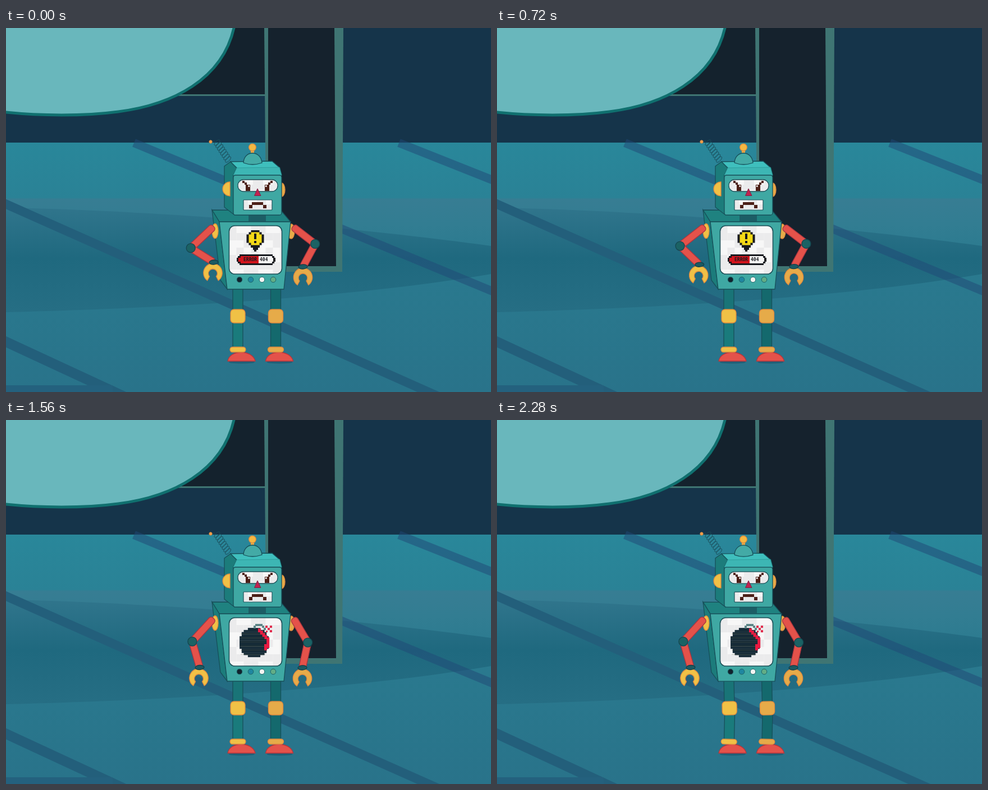
An HTML page with a canvas for the animation above (2.32 s loop, 864 by 648 pixels).

```html
<!DOCTYPE html>
<html lang="en">
<head>
<meta charset="utf-8">
<title>Robot</title>
<style>
html, body { margin: 0; width: 100%; height: 100%; overflow: hidden; background: #15344a; }
canvas { display: block; width: 100vw; height: 100vh; }
</style>
</head>
<body>
<canvas id="stage" width="864" height="648"></canvas>
<script>
const c = document.getElementById('stage').getContext('2d');
const LOOP = 2320, STEP = 40, SCREEN_SWAP = 1440;
const INK = '#17505a', FRONT = '#3fa8a3', SIDE = '#1c7c7b', RED = '#e4524a', BROWN = '#4d2018';
const YELLOW = '#f0c146', ORANGE = '#e6ab49', RIM = '#e08a3f';

function paint(fill, stroke, width = 1.3) {
  if (fill) { c.fillStyle = fill; c.fill(); }
  if (stroke) { c.strokeStyle = stroke; c.lineWidth = width; c.stroke(); }
}
function poly(points, fill, stroke, width) {
  c.beginPath();
  for (let i = 0; i < points.length; i += 2) c.lineTo(points[i], points[i + 1]);
  c.closePath();
  paint(fill, stroke, width);
}
function oval(x, y, rx, ry, fill, stroke, width) {
  c.beginPath();
  c.ellipse(x, y, rx, ry, 0, 0, 7);
  paint(fill, stroke, width);
}
function box(x, y, w, h, r, fill, stroke, width) {
  c.beginPath();
  c.roundRect(x, y, w, h, r);
  paint(fill, stroke, width);
}
function rect(fill, x, y, w, h) {
  c.fillStyle = fill;
  c.fillRect(x, y, w, h);
}
function line(x1, y1, x2, y2, width, color) {
  c.beginPath();
  c.moveTo(x1, y1);
  c.lineTo(x2, y2);
  paint(null, color, width);
}
function at(x, y, angle, draw) {
  c.save();
  c.translate(x, y);
  c.rotate(angle);
  draw();
  c.restore();
}
// Outlined bar from one point to another
function bar(x1, y1, x2, y2, w, r, fill, stroke) {
  at(x1, y1, Math.atan2(y2 - y1, x2 - x1), () =>
    box(0, -w / 2, Math.hypot(x2 - x1, y2 - y1), w, r, fill, stroke));
}
function ramp(y1, y2, stops) {
  const g = c.createLinearGradient(0, y1, 0, y2);
  for (const [p, color] of stops) g.addColorStop((p - y1) / (y2 - y1), color);
  return g;
}

function background() {
  rect('#15344a', 0, 0, 864, 204);
  rect('#14222d', 250, 0, 212, 119);
  rect('#3f7573', 290, 118, 172, 3);

  rect(ramp(204, 648, [[204, '#29879a'], [302, '#2a8296'], [305, '#377d93'],
    [350, '#327d92'], [410, '#2a7a8f'], [648, '#29738a']]), 0, 204, 864, 444);
  c.beginPath();
  c.moveTo(0, 320);
  c.bezierCurveTo(290, 325, 640, 357, 864, 388);
  c.lineTo(864, 438);
  c.bezierCurveTo(640, 476, 330, 498, 0, 506);
  paint(ramp(320, 506, [[320, '#30758c'], [410, '#1f697f'], [506, '#266e84']]));

  line(228, 204.5, 870, 470, 15, 'rgba(33,73,118,.5)');
  line(700, 204.5, 870, 272, 15, 'rgba(33,73,118,.5)');
  line(-10, 309, 775, 658, 16, '#235f7b');
  line(-10, 554, 210, 656, 18, '#235f7b');
  rect('#24617e', 0, 636, 190, 12);

  poly([460, 0, 601, 0, 599, 434, 464, 434], '#3f7573');
  poly([467, 0, 585, 0, 588, 424, 467, 424], '#15222d');

  c.beginPath();
  c.moveTo(-10, -10);
  c.lineTo(-10, 149);
  c.bezierCurveTo(60, 157, 140, 157, 200, 149);
  c.bezierCurveTo(292, 137, 390, 94, 408, -10);
  paint('#69b7bc', '#10706f', 5);
}

function leg(x, dip, bend, pad, thigh, shin) {
  const s = Math.sqrt(dip), kx = x + bend * s, ky = 513 + 0.7 * dip;
  oval(x + 7, 595, 23, 2.5, 'rgba(25,75,100,.5)');
  bar(x - 0.06 * dip, 460 + dip, kx, ky, 18, 0, thigh, INK);
  bar(kx + 2.1 * s, ky + 9, x + 2 * s, 573, 18, Math.min(4, s), shin, INK);
  at(kx, ky, -0.08 * s, () => box(-13, -12, 26, 24, 6, pad, RIM));
  c.beginPath();
  c.moveTo(x - 18, 593);
  c.bezierCurveTo(x - 15, 572, x + 26, 572, x + 31, 593);
  c.closePath();
  paint(RED, '#b8343c');
  at(x + 1.1 * s, 572.5 + 0.8 * s, 0.14 * s, () => box(-14, -4.5, 28, 9, 4.5, pad, RIM));
}

// Two-bone arm; side is -1 for left, 1 for right
function arm(sx, sy, wx, wy, upper, lower, side, color) {
  const dx = wx - sx, dy = wy - sy, d = Math.min(Math.hypot(dx, dy), upper + lower - 0.1);
  const bend = Math.acos((upper * upper + d * d - lower * lower) / (2 * upper * d));
  const a = Math.atan2(dy, dx) - side * bend;
  const ex = sx + upper * Math.cos(a), ey = sy + upper * Math.sin(a);
  bar(sx - 4 * Math.cos(a), sy - 4 * Math.sin(a), ex, ey, 12.5, 5, RED, '#a93440');
  bar(ex, ey, wx, wy, 12.5, 4, RED, '#a93440');
  oval(ex, ey, 8, 8, '#1b6264', '#154650');
  const hx = wx - (side < 0 ? 1.5 : 0), hy = wy + 19;
  c.beginPath();
  c.arc(hx, hy, 16.7, 2.2, 7.23);
  c.arc(hx, hy + 1, 8, 7.0, 2.42, true);
  c.closePath();
  paint(color, RIM);
  at(wx, wy, -0.05, () => oval(0, 0, 8, 4, '#1b5a62', '#143f49'));
}

// Rounded white panel with a faint checker and an outline
function panel(x, y, w, h, r, size, width) {
  box(x, y, w, h, r, '#f7f7f7');
  c.save();
  c.clip();
  for (let j = 0; j * size < h; j++)
    for (let i = 0; i * size < w; i++)
      if ((i * 3 + j * 5 + i * j) % 4 < 2) rect('#ebebec', x + i * size, y + j * size, size, size);
  c.restore();
  box(x, y, w, h, r, null, '#1f525a', width);
}

// Disc built of square cells
function disc(x, y, r, cell, color) {
  const n = Math.ceil(r / cell);
  for (let j = -n; j < n; j++) {
    const v = (j + 0.5) * cell;
    if (Math.abs(v) >= r) continue;
    const half = Math.round(Math.sqrt(r * r - v * v) / cell) * cell;
    rect(color, x - half, y + j * cell, half * 2, cell + 0.3);
  }
}

function warning() {
  const dark = '#17191f';
  rect(dark, 436, 386, 16, 5);
  rect(dark, 440, 390, 9, 5);
  rect(dark, 442, 394, 4, 4);
  for (const [w, h] of [[15, 30], [23, 23], [31, 15]]) rect(dark, 444 - w / 2, 375 - h / 2, w, h);
  for (const [w, h] of [[15, 23], [23, 15]]) rect('#f4d916', 444 - w / 2, 375 - h / 2, w, h);
  rect(dark, 442, 366, 4, 10);
  rect(dark, 442, 379, 4, 4);

  rect(dark, 416, 403, 59, 19);
  rect(dark, 413, 406, 65, 13);
  rect(dark, 411, 409, 69, 7);
  rect('#f5f5f5', 450, 406, 24, 13);
  rect('#f5f5f5', 473, 409, 3, 7);
  rect('#d3141c', 418, 406, 32, 13);
  rect('#d3141c', 414, 409, 5, 7);
  c.fillStyle = dark;
  c.font = 'bold 8px "DejaVu Sans Mono", monospace';
  c.textBaseline = 'middle';
  c.fillText('ERROR', 423, 413);
  c.fillText('404', 452, 413);
}

function bomb() {
  disc(442, 396, 27, 3.7, '#162b37');
  for (let i = 0; i < 5; i++) rect('#ea1a42', 449 + i * 3.8, 371 + i * 4, 5, i < 4 ? 7 : 19);
  rect('#ea1a42', 460, 399, 5, 11);
  for (let y = 380; y < 420; y += 7.4) rect('rgba(95,98,60,.4)', 418, y, 44, 0.7);
  rect('#5c8587', 441, 366, 4, 5);
  rect('#5c8587', 444, 363, 13, 4);
  rect('#5c8587', 456, 366, 4, 4);
  rect('#5c8587', 459, 370, 4, 4);
  rect('#e02c4d', 462, 366, 4, 4);
  rect('#e02c4d', 470, 366, 4, 4);
  rect('#e02c4d', 466, 370, 4, 4);
  rect('#e02c4d', 470, 374, 4, 4);
  rect('#e02c4d', 463, 375, 3, 3);
}

function torso(t) {
  poly([367, 324, 490, 325, 507, 345, 380, 345], '#1f8280', INK);
  rect('#1c5d65', 432, 331, 31, 13);
  poly([367, 324, 380, 345, 394, 465, 382, 449], SIDE, INK);
  poly([380, 345, 507, 345, 495, 465, 394, 465], FRONT, INK);
  panel(397.5, 352, 94, 86, 10, 13, 1.6);
  (t < SCREEN_SWAP ? warning : bomb)();
  ['#10222d', '#2087a0', '#f3f5f2', '#62ad86'].forEach((color, i) =>
    oval(416 + i * 20, 448, 4.8, 4.8, color, '#1d6468', 1));
}

function head() {
  // Spring
  for (let i = 0; i < 8; i++)
    at(376 + i * 2.8, 204 + i * 4.3, -0.8, () => oval(0, 0, 6.5, 2.9, null, '#1b4b57', 0.9));
  line(365, 203, 372, 201, 1, '#1b4b57');
  oval(364.5, 202.5, 2.7, 2.7, '#f0a04a', RIM, 0.8);

  oval(491, 288, 6, 12, ORANGE, RIM);
  poly([389, 246, 400, 238, 411, 249, 405, 262, 407, 333, 389, 319], SIDE, INK);
  poly([400, 238, 474, 237, 488, 249, 491, 262, 405, 262, 411, 249], '#3fbfbd', INK);
  poly([411, 249, 487, 248, 491, 262, 405, 262], '#3db6b4', '#2a9796', 0.8);
  box(405, 262, 86, 71, 4, FRONT, INK);
  c.beginPath();
  c.ellipse(399, 286.5, 13, 12.5, 0, Math.PI / 2, Math.PI * 1.5);
  c.closePath();
  paint(YELLOW, RIM);

  rect(ORANGE, 436, 216, 6, 9);
  oval(439, 212.5, 6.3, 6.3, '#f4b942', RIM);
  c.beginPath();
  c.moveTo(423, 240);
  c.bezierCurveTo(424, 217, 454, 217, 456, 240);
  c.quadraticCurveTo(439, 246, 423, 240);
  paint('#43aaa6', INK);

  panel(413, 270, 71, 21, 10, 9, 1.3);
  for (const s of [-1, 1]) {
    const px = (x, y, w, h, color = BROWN) =>
      rect(color, 448 + s * x - (s < 0 ? w : 0), y, w, h);
    px(23, 272, 4, 4);
    px(19, 275, 4, 4);
    px(13, 279, 8, 11);
    px(14, 280, 2.5, 3, '#f7f7f7');
  }
  poly([448, 286, 454, 298.5, 442.5, 298.5], '#c12450', '#7a2244', 1);

  panel(423, 306, 51, 18, 1, 8, 1.2);
  rect(BROWN, 438, 310, 20, 5);
  rect(BROWN, 433, 315, 6, 6);
  rect(BROWN, 458, 315, 6, 6);
}

// Wrist poses: time, left x, y, right x, y
const wrists = [
  [0, 370, 417, 529, 425],
  [440, 373, 424, 531.5, 425.5],
  [960, 351, 419, 527, 424],
  [1340, 345, 440.5, 528, 441],
  [LOOP, 345, 440.5, 528, 441]
];
function wristsAt(t) {
  const i = wrists.findIndex(k => k[0] > t), a = wrists[i - 1], b = wrists[i];
  const u = (t - a[0]) / (b[0] - a[0]), e = u * u * (3 - 2 * u);
  return a.map((v, n) => v + (b[n] - v) * e);
}

// One squat near the end of the loop
function dipAt(t) {
  const p = (t - 1727) / 560;
  return p > 0 && p < 1 ? 16.6 * (1 - Math.cos(p * 2 * Math.PI)) : 0;
}

function draw(t) {
  const dip = dipAt(t), sway = -0.06 * dip, [, lx, ly, rx, ry] = wristsAt(t);
  background();
  leg(480.5, dip, 4.6, ORANGE, '#14696d', '#14696d');
  leg(413, dip, 5.07, YELLOW, '#197477', '#1a7b7c');
  c.save();
  c.translate(sway, dip);
  oval(508, 362, 6, 13, ORANGE, RIM);
  torso(t);
  oval(372.5, 361.5, 5.5, 13, YELLOW, RIM);
  head();
  c.restore();
  arm(367 + sway, 356 + dip, lx, ly, 52, 48, -1, YELLOW);
  arm(514 + sway, 356 + dip, rx, ry, 46.5, 46, 1, ORANGE);
}

const start = performance.now();
function tick() {
  const t = (performance.now() - start) % LOOP;
  draw(Math.floor(t / STEP) * STEP);
  requestAnimationFrame(tick);
}
tick();
</script>
</body>
</html>
```
